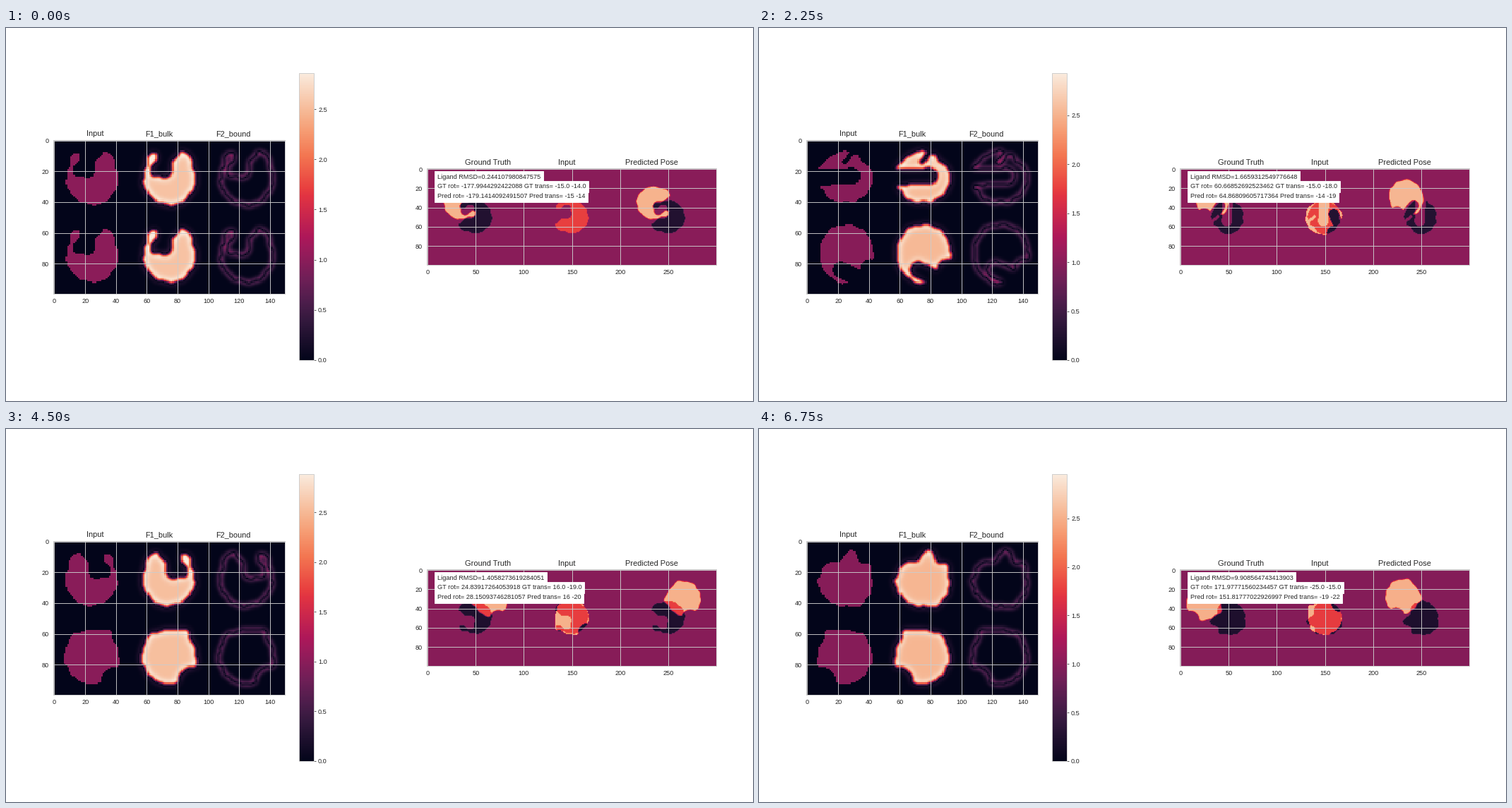
Animation, 1058 px wide and 529 px high, one loop 7.5 s. Source, as a matplotlib script:

```python
import numpy as np
import matplotlib.pyplot as plt
from matplotlib.animation import FuncAnimation
from matplotlib.colors import LinearSegmentedColormap

W, H = 1058, 529
INK, GRID = ".15", ".8"
UNIT = .255  # share of the colour range per unit in the pose panel

plt.rcParams.update({
    "font.family": "Liberation Sans", "font.size": 10,
    "text.color": INK, "xtick.color": INK, "ytick.color": INK,
    "axes.edgecolor": GRID, "axes.linewidth": 1, "axes.axisbelow": True,
    "xtick.bottom": False, "ytick.left": False,
})

rocket = LinearSegmentedColormap.from_list("rocket", [
    (0, "#03051a"), (1 / 7, "#35193e"), (.2, "#4c1d4b"), (2 / 7, "#701f57"),
    (.4, "#a11a5b"), (3 / 7, "#ad1759"), (4 / 7, "#e13342"), (.6, "#e83f3f"),
    (5 / 7, "#f37651"), (.8, "#f69c73"), (6 / 7, "#f6b48f"), (1, "#faebdd")], N=256)


def blob(seed, center, radii, bumps=(), bites=()):
    """Rough ellipse in a 50 x 50 tile, as a test for points inside it.

    bumps: (angle, height, width); bites: round-ended channels that leave
    from a point, (x, y, radius, direction, widening). Angles in degrees.
    """
    rng = np.random.default_rng(seed)
    phases = rng.uniform(0, 2 * np.pi, 10)

    def inside(x, y):
        u, v = (x - center[0]) / radii[0], (y - center[1]) / radii[1]
        a = np.arctan2(v, u)
        edge = 1 + .01 * sum(np.sin(k * a + p) for k, p in enumerate(phases, 4))
        for at, height, width in bumps:
            off = (np.degrees(a) - at + 180) % 360 - 180
            edge = edge + height * np.exp(-(off / width) ** 2)
        hit = np.hypot(u, v) < edge
        for bx, by, r, heading, widen in bites:
            dx, dy = np.cos(np.radians(heading)), np.sin(np.radians(heading))
            t = np.maximum((x - bx) * dx + (y - by) * dy, 0)
            hit = hit & (np.hypot(x - bx - t * dx, y - by - t * dy) > r + widen * t)
        return hit

    return inside


def flip(shape):
    return lambda x, y: shape(50 - x, y)


hook = blob(1, (25.3, 25.5), (16.7, 17), [(-60, .17, 25), (-125, .15, 25)],
            [(22, 20.5, 4.7, -90, 0), (17, 20, 4.4, -50, 0)])
fin = blob(2, (26, 28), (17.5, 15.5), [(-145, .2, 35), (-55, .1, 30), (60, .12, 25)],
           [(18, 32.5, 6, 188, .25)])
spur = blob(3, (24.5, 25.5), (16.5, 17),
            [(-36, .27, 9), (168, .1, 15), (38, .11, 20), (132, .11, 20),
             (-130, .18, 20), (-160, -.15, 15)])
crescent = blob(4, (25.5, 24.5), (17.5, 16.5), [(-45, -.15, 15)],
                [(30, 23.7, 5.3, 178, 0), (25, 14.5, 1.5, -50, 0)])
jelly = blob(5, (26, 24), (17.5, 19), (),
             [(41.5, 34.5, 7, 45, 0), (22.5, 34.5, 5.3, 25, 0)])
cap = blob(6, (26, 25), (17, 19), [(-57, .08, 20), (43, .2, 18)],
           [(20, 36, 5.8, 165, 0)])
mouth = blob(7, (24, 26), (17, 17.5), [(-41, .22, 18), (80, .05, 15)],
             [(33, 25, 4.5, 0, .35)])
apple = blob(8, (25, 28), (17.8, 14.5),
             [(-80, .5, 13), (-43, .25, 14), (-133, .1, 15), (57, .13, 20),
              (160, -.08, 25)])
claw = blob(9, (25.5, 25.5), (18, 18), (),
            [(14.5, 29.7, 3.5, 170, 0), (11, 43, 6.5, 135, 0), (9.5, 16, 6, -150, 0)])
bird = blob(10, (22, 25), (15.5, 17.5),
            [(-130, -.15, 30), (31, .2, 12), (60, .13, 12), (-47, .17, 18)],
            [(31.5, 26.5, 4, 10, .5), (23.5, 40, 2.8, 90, 0)])
leaf = blob(11, (25.5, 24), (18, 16),
            [(-138, .12, 15), (143, .14, 12), (39, .14, 12), (75, -.16, 12),
             (97, .1, 8), (-48, .1, 10)], [(37, 14.5, 1.5, -15, 0)])
block = blob(12, (25, 25.5), (17.5, 17.5), [(-123, .17, 15), (-40, .07, 25)],
             [(10, 41, 9, 135, 0)])

# receptor, ligand, feature peak, background level, RMSD,
# true rotation and shift, predicted rotation and shift
SCENES = [
    (hook, hook, 2.859, .345, "0.244107980847575",
     "-177.9944292422088", (-15., -14.), "-179.1414092491507", (-15, -14)),
    (flip(cap), flip(spur), 2.852, .35, "1.8302716459120382",
     "98.41627350918246", (28., -9.), "95.20718364925147", (27, -10)),
    (fin, spur, 2.851, .39, "1.1193724493323414",
     "-34.59610001412475", (12., -22.), "-36.88220189536845", (11, -22)),
    (crescent, jelly, 2.931, .35, "1.6659312549776648",
     "60.66852692523462", (-15., -18.), "64.86809605717364", (-14, -19)),
    (flip(leaf), flip(mouth), 2.878, .355, "2.3718264509127364",
     "-71.32840956172834", (20., -16.), "-76.91402837465128", (20, -17)),
    (cap, mouth, 2.938, .36, "4.464387065573167",
     "61.671307978419215", (12., -18.), "49.117898397177676", (11, -21)),
    (flip(hook), flip(block), 2.886, .34, "1.4058273619284051",
     "24.83917264053918", (16., -19.), "28.15093746281057", (16, -20)),
    (apple, claw, 2.956, .33, "0.1764341155661514",
     "171.97771560234457", (-24., -13.), "172.76869248936708", (-24, -13)),
    (bird, leaf, 2.926, .365, "47.78912770181927",
     "-136.88022847672212", (30., -7.), "-110.05760432302931", (-6, 24)),
    (apple, block, 2.956, .335, "9.908564743413903",
     "171.97771560234457", (-25., -15.), "151.81777022926997", (-19, -22)),
]


def blur(mask, s):
    i = np.arange(len(mask))
    g = np.exp(-(i[:, None] - i) ** 2 / (2 * s * s)) / (s * np.sqrt(2 * np.pi))
    return g @ mask @ g


def features(shape, peak):
    """Row of three tiles: the mask, its bulk and its boundary response."""
    y, x = np.mgrid[:50, :50] + .5
    mask = shape(x, y).astype(float)
    bulk = np.abs(2.55 * (1.6 * blur(mask, 1) - .6 * blur(mask, 2.2)))
    bound = 3.8 * np.abs(blur(mask, 1) - blur(mask, 1.7))
    return np.hstack([mask, np.minimum(bulk, peak), bound])


def place(shape, rot=0., shift=(0, 0), sub=1):
    """Turn and move a shape on a 100 x 100 field, with x and y swapped."""
    y, x = np.mgrid[:100, :100] + .5
    c, s = np.cos(np.radians(rot)), np.sin(np.radians(rot))
    offs = (np.arange(sub) + .5) / sub - .5
    total = np.zeros((100, 100))
    for oy in offs:
        for ox in offs:
            u, v = x + ox - 50 - shift[0], y + oy - 50 - shift[1]
            total += shape(25 + c * v - s * u, 25 + c * u + s * v)
    return total / sub ** 2


def axes_px(x0, y0, x1, y1):
    return fig.add_axes([x0 / W, 1 - y1 / H, (x1 - x0) / W, (y1 - y0) / H])


def panel(box, shape, xstep, titles, **kw):
    ax = axes_px(*box)
    im = ax.imshow(np.zeros(shape), cmap=rocket, aspect="auto", **kw)
    ax.set_xticks(range(0, shape[1], xstep))
    ax.set_yticks(range(0, shape[0], 20))
    ax.grid(color=GRID, lw=1)
    for x, label in titles:
        fig.text(x / W, 1 - (box[1] - 5.5) / H, label, fontsize=12, ha="center")
    return ax, im


fig = plt.figure(figsize=(16, 8), dpi=W / 16, facecolor="w")
_, feat = panel((67.4, 158.5, 394.6, 376.7), (100, 150), 20,
                [(126.2, "Input"), (216.4, "F1_bulk"), (322, "F2_bound")],
                interpolation="nearest", vmin=0, vmax=1)
ax, pose = panel((596.4, 199.5, 1005.6, 335.8), (100, 300), 50,
                 [(682.3, "Ground Truth"), (794.2, "Input"), (914.3, "Predicted Pose")])

bar = fig.colorbar(feat, cax=axes_px(415.2, 64, 435.6, 471))
bar.outline.set_edgecolor(GRID)
bar.ax.grid(False)

notes = [ax.text(10, y, "", bbox=dict(fc="w", ec="w")) for y in (10, 20, 30)]


def draw(i):
    rec, lig, peak, bg, rmsd, rot, move, rot_p, move_p = SCENES[i]
    feat.set_data(np.vstack([features(rec, peak), features(lig, peak)]))
    feat.set_clim(0, peak)

    fixed = place(rec)
    ligs = [place(lig, float(rot), move, 3), place(lig),
            place(lig, float(rot_p), move_p, 3)]
    pose.set_data(np.hstack([2 * m - fixed for m in ligs]))
    pose.set_clim(-bg / UNIT, (1 - bg) / UNIT)

    notes[0].set_text(f"Ligand RMSD={rmsd}")
    notes[1].set_text(f"GT rot= {rot} GT trans= {move[0]} {move[1]}")
    notes[2].set_text(f"Pred rot= {rot_p} Pred trans= {move_p[0]} {move_p[1]}")
    return [feat, pose, *notes]


anim = FuncAnimation(fig, draw, frames=len(SCENES), interval=750,
                     repeat=True, repeat_delay=0, blit=False)
plt.show()
```
